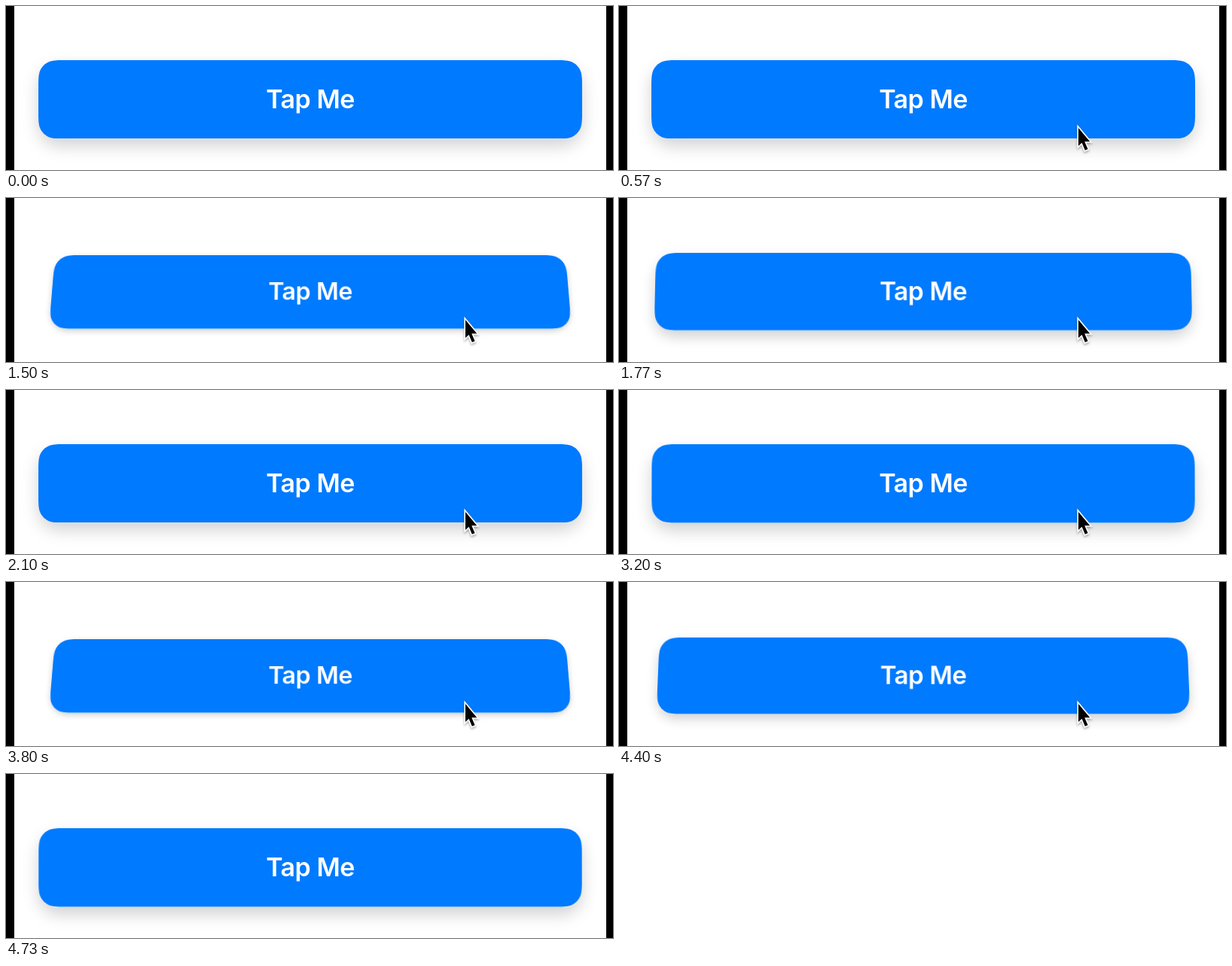
Recreate the animation shown at these times as an HTML page. Size 806x218 px, loop 5770 ms.

```html
<!DOCTYPE html>
<html lang="en">
<head>
<meta charset="utf-8">
<title>Tap Me</title>
<style>
  html, body { margin: 0; width: 100%; height: 100%; overflow: hidden; background: #000; }
  #stage { position: absolute; left: 0; top: 0; width: 806px; height: 218px; overflow: hidden; background: #000; }
  #page { position: absolute; left: 11px; top: 0; width: 786px; height: 218px; overflow: hidden; background: #fff; }
  #button { position: absolute; left: 32px; top: 71.5px; width: 722px; height: 104.5px; }
  #shadow { position: absolute; inset: 0; border-radius: 27px; }
  #button svg { position: absolute; left: 0; top: 0; }
  #label {
    position: absolute; inset: 0; text-align: center; color: #fff;
    font: 600 34px/104.5px Inter, "Liberation Sans", sans-serif;
    letter-spacing: -0.5px; white-space: nowrap;
  }
  #cursor {
    position: absolute; left: 0; top: 0; overflow: visible;
    filter: drop-shadow(0 2px 1.5px rgba(0, 0, 0, .3));
  }
</style>
</head>
<body>
<div id="stage">
  <div id="page">
    <div id="button">
      <div id="shadow"></div>
      <svg width="722" height="104.5"><path id="shape" fill="#007aff"/></svg>
      <div id="label">Tap Me</div>
    </div>
    <svg id="cursor" width="24" height="40">
      <path d="M2 4V28L6.6 23.8L10.8 33.8L14.6 32.2L10.3 22.2H17.3Z"
        fill="#000" stroke="#fff" stroke-width="3.2" paint-order="stroke"/>
    </svg>
  </div>
</div>
<script>
const LOOP = 5770, TICK = 1000 / 30;
const ENTER = 33, ARRIVE = 567, LEAVE = 4730;
// [press, release] in ms
const TAPS = [[1070, 1567], [2170, 2767], [3800, 4267]];
const FROM = { x: 777, y: 16 }, TO = { x: 597, y: 158 };

const $ = id => document.getElementById(id);
const mix = (a, b, p) => a + (b - a) * p;

// Rounded rectangle with continuous-curvature corners
function smoothRect(w, h, r) {
  const a = 1.528665 * r, b = 1.088493 * r, c = 0.868407 * r, d = 0.631494 * r,
        e = 0.074911 * r, f = 0.372824 * r, g = 0.16906 * r;
  const corner = [[a, 0], [b, 0], [c, 0], [d, e], [f, g], [g, f], [e, d], [0, c], [0, b], [0, a]];
  const place = (fx, fy, flip) => {
    const pts = corner.map(([x, y]) => [fx ? w - x : x, fy ? h - y : y]);
    return flip ? pts.reverse() : pts;
  };
  const all = [place(0, 0, true), place(1, 0, false), place(1, 1, true), place(0, 1, false)];
  return all.map((p, i) => (i ? "L" : "M") + p[0] + "C" + p.slice(1).join(" ")).join("") + "Z";
}

// Critically damped spring, 0 to 1
function spring(ms) {
  const x = 13 * ms / 1000;
  return ms > 520 ? 1 : 1 - (1 + x) * Math.exp(-x);
}

function pressAmount(t) {
  let amount = 0;
  for (const [down, up] of TAPS) {
    if (t >= down - 5) amount = t < up ? 1 : 1 - spring(t - up);
  }
  return amount;
}

function draw(time) {
  const now = time % LOOP;
  const t = Math.floor((now + 5) / TICK) * TICK;

  const p = pressAmount(t);
  $("button").style.transform = p
    ? `perspective(722px) rotateX(${10 * p}deg) scale(${1 - 0.05 * p})` : "none";
  $("shadow").style.boxShadow =
    `0 ${mix(10, 3, p)}px ${mix(22, 8, p)}px rgba(0,0,0,.18)`;

  const u = Math.min(1, Math.max(0, (t - ENTER) / (ARRIVE - ENTER)));
  const move = 1 - (1 - u) ** 2;
  const cursor = $("cursor");
  cursor.style.visibility = now >= 30 && now < LEAVE ? "visible" : "hidden";
  cursor.style.transform =
    `translate(${mix(FROM.x, TO.x, move)}px, ${mix(FROM.y, TO.y, move)}px)`;
}

$("shape").setAttribute("d", smoothRect(722, 104.5, 24));
const start = performance.now();
function frame() {
  draw(performance.now() - start);
  requestAnimationFrame(frame);
}
frame();
</script>
</body>
</html>
```
